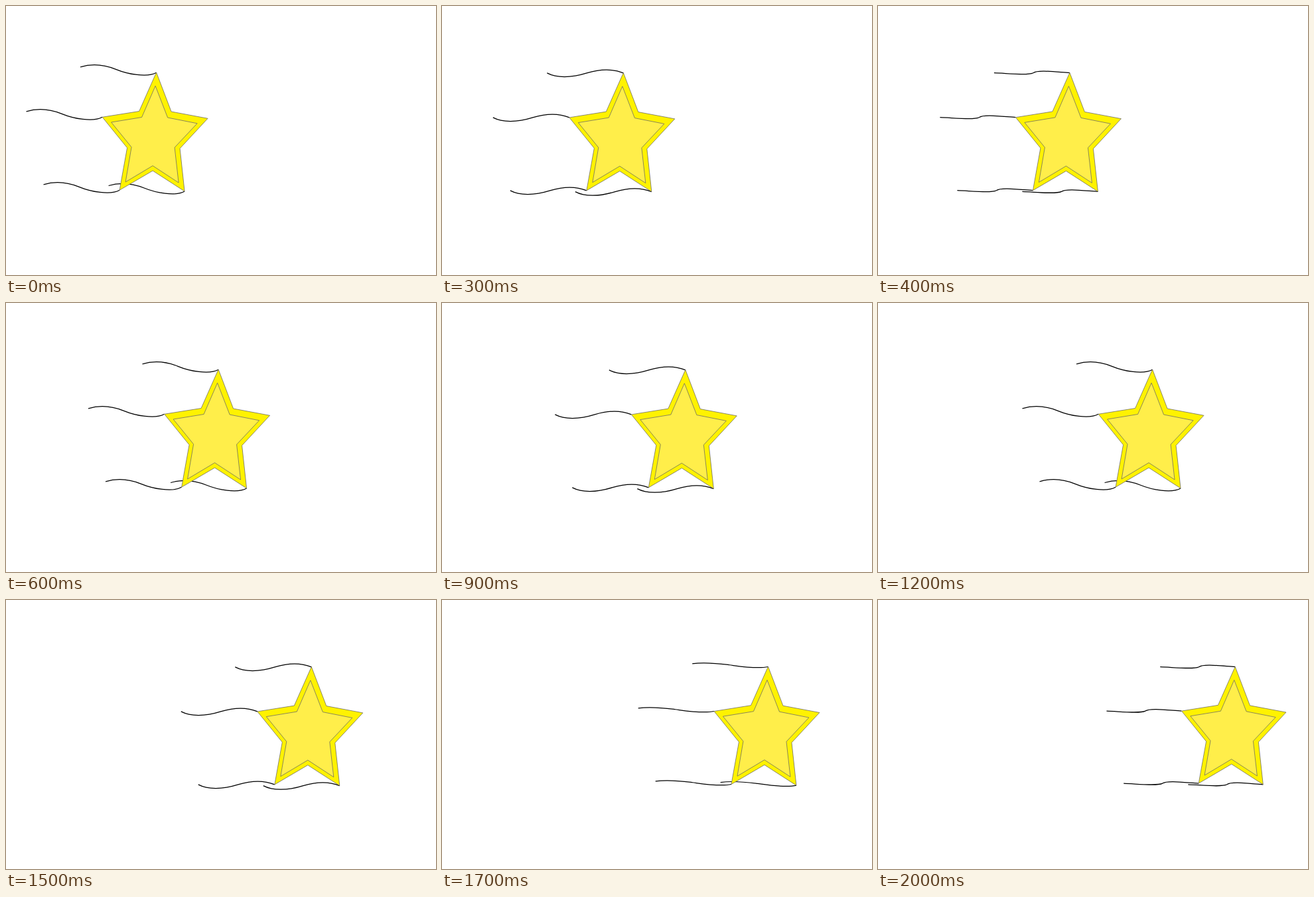
Write an HTML page that moves like this. It is 648 px wide and 405 px high and loops after 2.1 s.

```html
<!DOCTYPE html>
<html lang="en">
<head>
<meta charset="utf-8">
<title>Flying star</title>
<style>
  html, body { margin: 0; width: 100%; height: 100%; overflow: hidden; background: #fff; }
  svg { display: block; width: 100vw; height: 100vh; }
</style>
</head>
<body>
<svg viewBox="0 0 648 405">
  <g id="flyer">
    <g id="trails" fill="none" stroke="#000" stroke-width="1.25"></g>
    <g stroke="#666" stroke-width="0.75">
      <path fill="#fff200" d="M0,0 22.5,59 77.5,69.3 35.5,114.5 42.5,179 -5.5,148 -55.5,177.3 -44,113.5 -81.5,67.3 -26,58.5Z"/>
      <path fill="#ffee4a" d="M-1.5,20.3 17,68 61.5,76.8 27.5,113 33.5,166 -5.5,140.5 -46.5,165 -37.5,112.5 -68,75 -22,67.5Z"/>
    </g>
  </g>
</svg>
<script>
const STEP_MS = 100, STEPS = 21, STEP_X = 15.58;
const flyer = document.getElementById('flyer');
const trails = document.getElementById('trails');

// Two joined cubic curves, relative to the star corner they hang from.
const crest  = [-114.5, -8.5, -95, -14.5, -76, -11, -61, -5, -44, 2, -14, 8, 0, 0];
const flat   = [-114, 0, -90, 1, -63, 4, -55, 0, -48, -5, -22, -1.5, 0, 0];
const trough = [-115, 0, -101, 7.5, -79, 7.5, -55, 0, -37, -5.5, -17, -7, 0, 0];

const mix = (a, b, k) => a.map((v, i) => v + (b[i] - v) * k);
const rising = mix(crest, flat, 0.45);
const wave = [crest, rising, flat, trough, flat, rising];
const bob = [0, 0.2, 0.4, 0.6, 0.4, 0.2];

const corners = [[0, 0.3], [-81.5, 67.3], [-55.5, 177.3], [42.5, 179]];
const paths = corners.map(([x, y]) => {
  const path = document.createElementNS('http://www.w3.org/2000/svg', 'path');
  path.setAttribute('transform', `translate(${x} ${y})`);
  return trails.appendChild(path);
});

function draw(ms) {
  const step = Math.floor(ms / STEP_MS) % STEPS;
  const phase = step % wave.length;
  const [x, y, ...curve] = wave[phase];
  const scale = 1 - 0.0045 * Math.max(0, step - 18);
  flyer.setAttribute('transform',
    `translate(${226.6 + step * STEP_X} ${100 + bob[phase]}) scale(${scale})`);
  paths.forEach(path => path.setAttribute('d', `M${x},${y}C${curve}`));
}

const start = performance.now();
function tick() {
  draw(performance.now() - start);
  requestAnimationFrame(tick);
}
tick();
</script>
</body>
</html>
```
